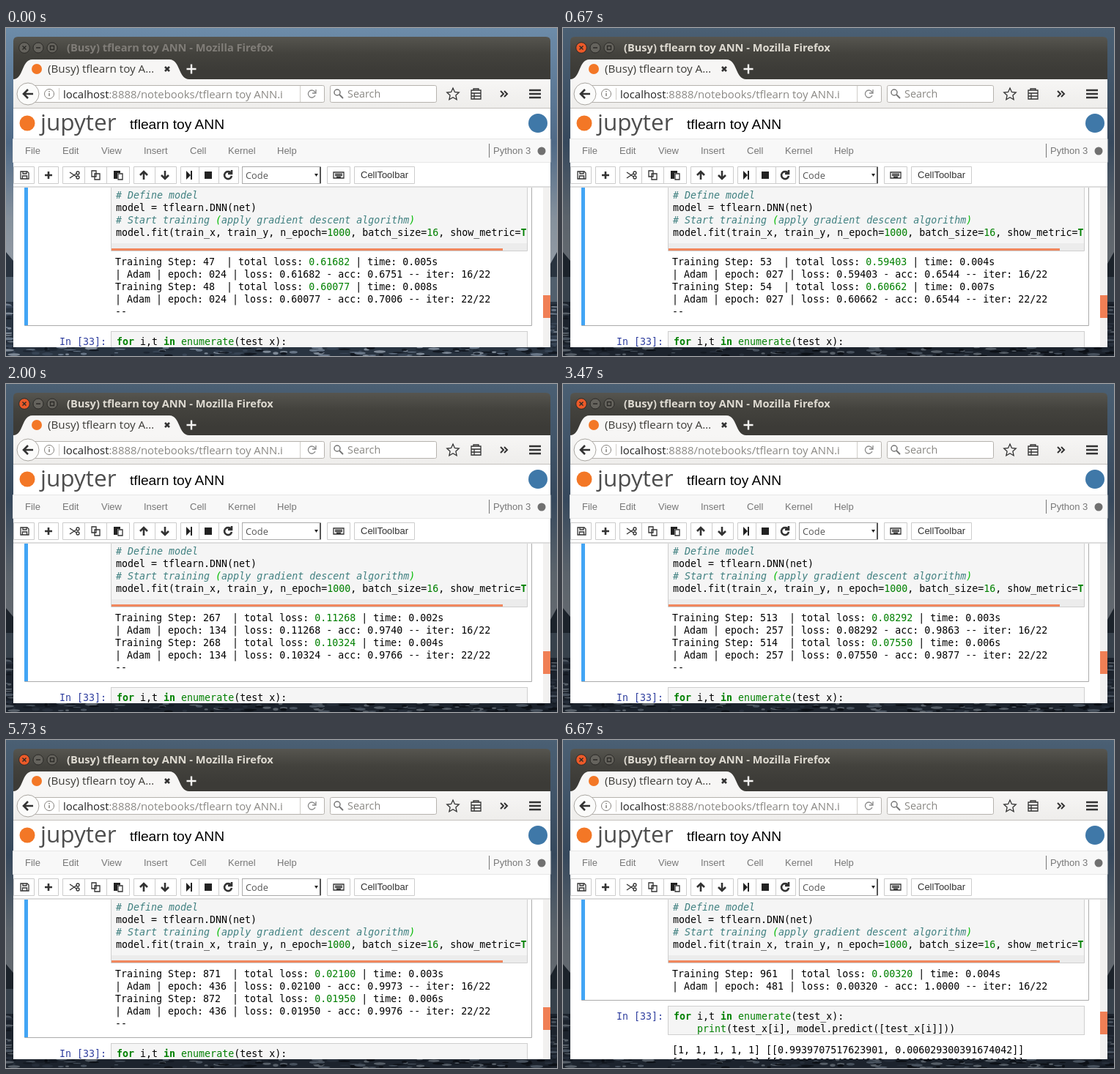
An HTML page for the animation above (6.74 s loop, 752 px wide and 448 px high).

```html
<!DOCTYPE html>
<html lang="en">
<head>
<meta charset="utf-8">
<title>Notebook training run</title>
<style>
  html, body { margin: 0; width: 100%; height: 100%; overflow: hidden; background: #3c4f66; }
  svg { display: block; width: 752px; height: 448px; }
  text { white-space: pre; }
  .ui { font-family: "Open Sans", "Noto Sans", sans-serif; }
  .page { font: 13px "Liberation Sans", Arial, sans-serif; fill: #777; }
  .code { font: 13.3px "DejaVu Sans Mono", monospace; fill: #000; }
  .kw { fill: #008000; font-weight: bold; }
  .fn { fill: #008000; }
  .rem { fill: #408080; font-style: italic; }
  .hit { fill: #00bb00; }
  .btn { fill: #fff; stroke: #ccc; }
  .field { fill: #fff; stroke: #b6b3ae; }
  .cell { fill: #f5f5f5; stroke: #cfcfcf; }
  .line { fill: none; stroke: #333; stroke-width: 1.3; }
  .bold { stroke-width: 2.6; }
  .ink { fill: #222; }
</style>
</head>
<body>
<svg viewBox="0 0 752 448">
  <defs>
    <linearGradient id="sky" x2="0" y2="1">
      <stop offset="0" stop-color="#7c9fc0"/><stop offset=".35" stop-color="#5a7899"/>
      <stop offset=".58" stop-color="#98a5b2"/><stop offset=".69" stop-color="#a3adb8"/>
    </linearGradient>
    <linearGradient id="bar" x2="0" y2="58" gradientUnits="userSpaceOnUse" y1="12" x1="0">
      <stop offset="0" stop-color="#56554f"/><stop offset=".5" stop-color="#43423d"/>
      <stop offset="1" stop-color="#3c3b37"/>
    </linearGradient>
    <linearGradient id="nav" x2="0" y2="1">
      <stop offset="0" stop-color="#f7f6f5"/><stop offset="1" stop-color="#eeedeb"/>
    </linearGradient>
    <clipPath id="view"><path d="M10 218H733V436H10z"/></clipPath>
    <clipPath id="input"><path d="M144 218H711V304H144z"/></clipPath>
  </defs>

  <!-- desktop -->
  <path fill="url(#sky)" d="M0 0H752V448H0z"/>
  <path fill="#2f3a48" d="M0 306L10 318V345H0zM743 322L752 306V345H743z"/>
  <path fill="#5c6c7c" d="M0 340H752V378H0z"/>
  <path fill="#2f3b4a" d="M0 374H752V448H0z"/>
  <g id="rocks"></g>
  <path id="shade" d="M0 0H752V448H0z"/>

  <!-- switcher outline -->
  <g id="outline" fill="none">
    <rect x="7" y="6" width="738" height="437" stroke="#0b1220" stroke-opacity=".5" stroke-width="8"/>
    <rect x="5.500" y="4.500" width="741" height="441" stroke="#06080d"/>
    <rect x="8.500" y="8.500" width="735" height="432" stroke="#8292a8" stroke-opacity=".6"/>
  </g>

  <!-- title bar and tab -->
  <path fill="url(#bar)" d="M10 436V18Q10 12 16 12H737Q743 12 743 18V436z"/>
  <g stroke="#2b2a27">
    <circle id="close" cx="25" cy="27" r="7.300"/>
    <g fill="#65635d"><circle cx="44" cy="27" r="7"/><circle cx="63" cy="27" r="7"/></g>
    <path fill="none" stroke-width="1.400" d="M22.500 24.500l5 5m0-5l-5 5M41 27h6M60.500 24.500h5v5h-5z"/>
  </g>
  <text id="title" class="ui" x="83" y="32" font-size="14.600" font-weight="700">(Busy) tflearn toy ANN - Mozilla Firefox</text>
  <path fill="#f7f6f5" d="M10 70C24 70 21 43 36 43H223C238 43 235 70 250 70z"/>
  <circle cx="42" cy="56" r="7" fill="#f37726"/>
  <text class="ui" x="57" y="61" font-size="15.200" fill="#3c3b37">(Busy) tflearn toy A…</text>
  <path class="line bold" d="M217 53l6 6m0-6l-6 6"/>
  <path stroke="#f5f4f2" stroke-width="2.400" d="M246.500 56h13m-6.500-6.500v13"/>

  <!-- navigation -->
  <path fill="url(#nav)" d="M10 70H743V110H10z"/>
  <path stroke="#c4c1bd" d="M10 109.500H743"/>
  <rect class="field" x="36.500" y="78.500" width="398" height="23" rx="2"/>
  <rect class="field" x="442.500" y="78.500" width="145" height="23" rx="2"/>
  <circle cx="30" cy="90" r="15" fill="#fbfbfa" stroke="#aaa7a2"/>
  <path class="line bold" d="M37 90H25M30 84l-6 6 6 6"/>
  <circle cx="59" cy="90" r="6.500" fill="none" stroke="#85827d"/>
  <path stroke="#85827d" stroke-width="1.500" d="M59 89v4M59 86v1.500"/>
  <path stroke="#d0cdc9" d="M72.500 82v16M401.500 79v22"/>
  <text class="ui" x="78" y="96" font-size="14.900" fill="#8a8884"><tspan fill="#222">localhost</tspan>:8888/notebooks/tflearn toy ANN.i</text>
  <path class="line" style="stroke:#888" d="M422 88a5 5 0 1 0 0 4M423 84v5h-5"/>
  <circle cx="452" cy="88" r="4" fill="none" stroke="#777" stroke-width="1.500"/>
  <path stroke="#777" stroke-width="2" d="M455 91l5 5"/>
  <text class="ui" x="466" y="95" font-size="14.400" fill="#8a8884">Search</text>
  <path class="line" d="M610 82l2.400 5.400 5.800.6-4.300 3.900 1.200 5.800-5.100-3-5.100 3 1.200-5.800-4.300-3.900 5.800-.6z"/>
  <path class="line" d="M635 85h13v12h-13zM638 85v-2h7v2M635 89h13M635 93h13M639 89v8"/>
  <path class="line" style="stroke-width:2" d="M675 86l4 4-4 4M680 86l4 4-4 4"/>
  <path class="line bold" d="M714 85h16M714 90h16M714 95h16"/>

  <!-- notebook header -->
  <path fill="#fff" d="M10 110H743V436H10z"/>
  <circle cx="29" cy="130" r="10.500" fill="#f37726"/>
  <text class="ui" x="47" y="139.500" font-size="31.500" fill="#4e4e4e">jupyter</text>
  <text class="page" x="169" y="138" style="font-size:19.200px;fill:#000">tflearn toy ANN</text>
  <circle cx="726" cy="130" r="13" fill="#3f78a8"/>
  <path fill="#f8f8f8" stroke="#e7e7e7" d="M9.500 151.500H743V183.500H9.500z"/>
  <g id="menu" class="page"></g>
  <path stroke="#777" d="M659.500 158v19"/>
  <circle cx="731" cy="168" r="5.500" fill="#707070"/>

  <!-- notebook toolbar -->
  <path class="btn" d="M10.500 189.500h28v23h-28zM44.500 189.500h27v23h-27zM77.500 189.500h91v23h-91zM107.500 190v22M137.500 190v22M174.500 189.500h58v23h-58zM203.500 190v22M238.500 189.500h79v23h-79zM263.500 190v22M290.500 190v22M438.500 189.500h31v23h-31zM475.500 189.500h82v23h-82z"/>
  <path class="line" d="M20 196h9l2 2v8h-11zM23 196v3h5v-3M22.500 206v-4h6v4"/>
  <path class="line bold" d="M53 201h10M58 196v10"/>
  <path class="line" d="M87 197l9 6M87 205l9-6"/>
  <circle class="line" cx="98" cy="198" r="2"/><circle class="line" cx="98" cy="204" r="2"/>
  <path class="line" d="M117 195h6v8h-6zM121 199h7v8h-7z"/>
  <path class="ink" d="M147 195h9v3h-4v8h-5z"/>
  <path class="line" d="M153 199h6v8h-6z"/>
  <path class="line bold" d="M188 207v-10M183 201l5-5 5 5M217 195v10M212 201l5 5 5-5"/>
  <path class="ink" d="M246 195l6 6-6 6zM252 195h2v12h-2zM271 196h10v10h-10z"/>
  <path class="line bold" d="M307 198a5 5 0 1 0 1 4M308 194v5h-5"/>
  <rect x="322.500" y="189.500" width="107" height="23" fill="#fff" stroke="#aaa"/>
  <text class="ui" x="327" y="206" font-size="12.800" fill="#555">Code</text>
  <path stroke="#555" stroke-width="2" d="M429 190v22"/>
  <path class="ink" d="M421 199h5l-2.500 4z"/>
  <path class="line" d="M447 197h14v8h-14zM449 199.500h10M449 201.500h10M451 203.500h6"/>
  <text class="page" x="484" y="205" style="fill:#333">CellToolbar</text>
  <path stroke="#ddd" stroke-width="2" d="M10 217H743"/>

  <!-- cells -->
  <g clip-path="url(#view)">
    <path id="frame" fill="none" stroke="#ababab"/>
    <path id="mark" fill="#42a5f5"/>
    <path class="cell" d="M143.500 210H711.500V304.500H143.500z"/>
    <g class="code" clip-path="url(#input)">
      <text class="rem" x="150" y="233"># Define model</text>
      <text x="150" y="250">model = tflearn.DNN(net)</text>
      <text class="rem" x="150" y="267"># Start training <tspan class="hit">(</tspan>apply gradient descent algorithm<tspan class="hit">)</tspan></text>
      <text x="150" y="284">model.fit(train_x, train_y, n_epoch=<tspan class="fn">1000</tspan>, batch_size=<tspan class="fn">16</tspan>, show_metric=<tspan class="kw">True</tspan></text>
      <path fill="#ececec" d="M144 294H711V304H144z"/>
      <path fill="#f0875e" d="M144 301H678V304H144z"/>
    </g>
    <g id="log" class="code"></g>
    <g id="next" class="code">
      <rect class="cell" x="143.500" y="363.500" width="568" height="39"/>
      <text x="73" y="382" fill="#303f9f">In [33]:</text>
      <text x="151" y="382"><tspan class="kw">for</tspan> i,t <tspan class="kw">in</tspan> <tspan class="fn">enumerate</tspan>(test_x):</text>
      <text x="151" y="399">    <tspan class="fn">print</tspan>(test_x[i], model.predict([test_x[i]]))</text>
      <text x="149" y="428">[1, 1, 1, 1, 1] [[0.9939707517623901, 0.006029300391674042]]</text>
      <text x="149" y="445">[1, 1, 0, 1, 0] [[0.9865302443504333, 0.013469771482050419]]</text>
    </g>
  </g>
  <path fill="#f2f1f0" d="M733 218H743V436H733z"/>
  <rect id="thumb" x="733" width="10" height="31" fill="#f07f55"/>
</svg>

<script>
const LOOP = 6740, FPS = 15, LAST = 100;
const $ = id => document.getElementById(id);
const set = (id, attrs) => {
  for (const [k, v] of Object.entries(attrs)) $(id).setAttribute(k, v);
};
const ramp = (t, a, b) => Math.min(1, Math.max(0, (t - a) / (b - a)));

// the log repaints in bursts of ticks, and holds between them
const bursts = [[0, 0], [2, 4], [11, 14], [28, 30], [52, 55], [64, 66], [86, 87], [94, LAST]];
const paintTick = n => Math.min(n, bursts.filter(b => b[0] <= n).pop()[1]);

// key points: tick, step, running loss, running accuracy, batch loss, ms
const keys = [
  [0, 47, .61682, .6751, .45632, 5],
  [4, 53, .59403, .6544, .71993, 4],
  [10, 53, .59403, .6544, .71993, 4],
  [30, 267, .11268, .9740, .0183, 1.5],
  [52, 513, .08292, .9863, .00872, 3],
  [86, 871, .02100, .9973, .006, 3],
  [LAST, 961, .00320, 1, .001, 4]
];

function training(tick) {
  const i = Math.max(1, keys.findIndex(k => k[0] >= tick));
  const from = keys[i - 1], to = keys[i];
  const k = ramp(tick, from[0], to[0]);
  const [, step, loss, acc, batchLoss, ms] = from.map((v, j) => v + (to[j] - v) * k);
  return { step: 2 * Math.floor(step / 2) + 1, loss, acc, batchLoss, ms };
}

function batchLines(step, epoch, iter, loss, acc, ms) {
  const value = loss.toFixed(5);
  return [
    `Training Step: ${step}  | total loss: <tspan class="fn">${value}</tspan> | time: ${(Math.round(ms) / 1000).toFixed(3)}s`,
    `| Adam | epoch: ${String(epoch).padStart(3, "0")} | loss: ${value} - acc: ${acc.toFixed(4)} -- iter: ${iter}/22`
  ];
}

// both metrics are moving averages with a decay of 0.9
function logLines(tick, partial) {
  const { step, loss, acc, batchLoss, ms } = training(tick);
  const epoch = (step + 1) / 2;
  const first = batchLines(step, epoch, 16, loss, acc, ms);
  if (partial) return first;
  const batchAcc = Math.min(1, 1.407 - 1.045 * batchLoss);
  const mix = (mean, v) => .9 * mean + .1 * v;
  return [
    ...first,
    ...batchLines(step + 1, epoch, 22, mix(loss, batchLoss), mix(acc, batchAcc), ms + 2.9),
    "--"
  ];
}

function draw(n) {
  const partial = n >= LAST;
  const foot = partial ? 355 : 406;
  $("log").innerHTML = logLines(paintTick(n), partial)
    .map((s, i) => `<text x="149" y="${324 + 17 * i}">${s}</text>`).join("");
  set("frame", { d: `M25.5 200H717.5V${foot + .5}H25.5z` });
  set("mark", { d: `M25 200h5V${foot}h-5z` });
  set("next", { transform: `translate(0 ${foot - 355})` });
  set("thumb", { y: partial ? 371 : 365 });

  const active = n >= 2;
  set("title", { fill: active ? "#dfdbd2" : "#807d78" });
  set("close", { fill: active ? "#ec5a29" : "#65635d" });
  set("shade", { opacity: .12 + .28 * ramp(n, 1, 4) });
  set("outline", { opacity: Math.min(ramp(n, 1, 4), 1 - ramp(n, 4, 10)) });
}

$("menu").innerHTML = Object.entries({
  File: 26, Edit: 77, View: 130, Insert: 188, Cell: 251, Kernel: 303, Help: 370, "Python 3": 665
}).map(([s, x]) => `<text x="${x}" y="172">${s}</text>`).join("");

// scattered stones along the lower edge
let seed = 7;
const rand = () => (seed = seed * 16807 % 2147483647) / 2147483647;
const tones = ["#76869a", "#8f9cab", "#141b25", "#3f4d60", "#222c3a"];
$("rocks").innerHTML = Array.from({ length: 190 }, (_, i) => {
  const side = rand() < .2;
  const x = side ? 743 * Math.round(rand()) + rand() * 9 : rand() * 752;
  const y = side ? 378 + rand() * 60 : 436 + rand() * 12;
  return `<ellipse cx="${x}" cy="${y}" rx="${2 + rand() * 7}" ry="${.6 + rand() * 1.5}" fill="${tones[i % 5]}"/>`;
}).join("");

const start = performance.now();
let shown = -1;
function play() {
  const t = (performance.now() - start) % LOOP;
  // tick times are cut to whole hundredths of a second
  const n = Math.min(LAST, Math.floor((t + 7) * FPS / 1000));
  if (n !== shown) draw(shown = n);
  requestAnimationFrame(play);
}
play();
</script>
</body>
</html>
```
